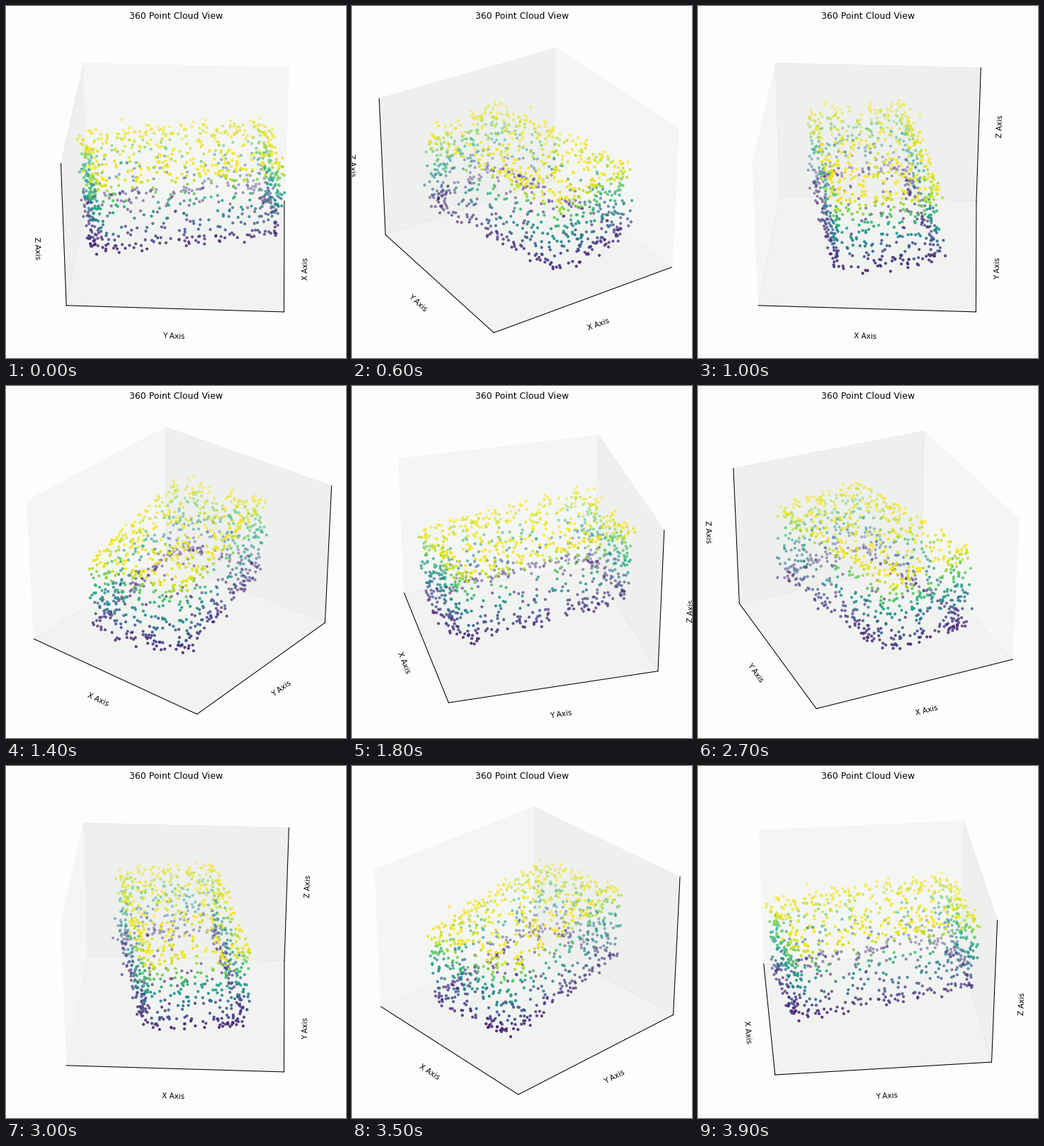
Write a matplotlib script that moves like this. It is 480 px wide and 497 px high and loops after 4 s.

```python
import numpy as np
import matplotlib.pyplot as plt
from matplotlib.animation import FuncAnimation

W, H, DPI = 480, 497, 75
FRAMES, INTERVAL = 40, 100
BACK = "#fcfefc"
HALF_XY, HALF_Z = 0.595, 0.446        # half sizes of the axes box
LONG, WIDE, TALL = 0.51, 0.27, 0.21   # half sizes of the scanned block
TURN = np.radians(12.4)

rng = np.random.default_rng(12)


def span(n, half):
    return rng.uniform(-half, half, n)


def wall(n, axis, side):
    """Upright face of the block on one side of the given axis."""
    pts = np.column_stack([span(n, WIDE), span(n, LONG), span(n, TALL)])
    pts[:, axis] = side * (WIDE, LONG)[axis]
    return pts


def slab(n, z, rim):
    """Level face; the share `rim` of its points lies on the border."""
    inner = int(n * (1 - rim))
    long_edge = int((n - inner) * 0.32)
    short_edge = (n - inner) // 2 - long_edge
    pts = np.vstack([
        np.column_stack([span(inner, WIDE), span(inner, LONG), np.zeros(inner)]),
        wall(long_edge, 0, -1), wall(long_edge, 0, 1),
        wall(short_edge, 1, -1), wall(short_edge, 1, 1),
    ])
    pts[:, 2] = z
    return pts


def make_cloud():
    pts = np.vstack([
        wall(135, 0, -1), wall(135, 0, 1),
        wall(130, 1, -1), wall(130, 1, 1),
        slab(300, TALL, 0.35), slab(220, -TALL, 0.75),
    ])
    pts += rng.normal(0, [0.02, 0.022, 0.018], pts.shape)
    w, l, z = pts.T
    x = w * np.cos(TURN) - l * np.sin(TURN)
    y = w * np.sin(TURN) + l * np.cos(TURN)
    return x, y, z


fig = plt.figure(figsize=(W / DPI, H / DPI), dpi=DPI, facecolor=BACK)
side = 464.2
ax = fig.add_axes([8.05 / W, 8 / H, side / W, side / H], projection="3d")
ax.set_facecolor(BACK)
for axis, grey in ((ax.xaxis, 0.93), (ax.yaxis, 0.88), (ax.zaxis, 0.905)):
    axis.set_pane_color((grey, grey + 0.01, grey, 0.5))
    axis.line.set_linewidth(1)

x, y, z = make_cloud()
ax.scatter(x, y, z, c=z, cmap="viridis", s=9, vmin=-0.27, vmax=0.222)

ax.set(xlim=(-HALF_XY, HALF_XY), ylim=(-HALF_XY, HALF_XY),
       zlim=(-HALF_Z, HALF_Z), xticks=[], yticks=[], zticks=[],
       xlabel="X Axis", ylabel="Y Axis", zlabel="Z Axis")
fig.text(0.5, 1 - 18.4 / H, "360 Point Cloud View", fontsize=12,
         ha="center", va="baseline")


def update(i):
    ax.view_init(elev=30, azim=3 + 360 * i / FRAMES)
    return []


anim = FuncAnimation(fig, update, frames=FRAMES, interval=INTERVAL,
                     repeat=True, repeat_delay=0, blit=False)
plt.show()
```
